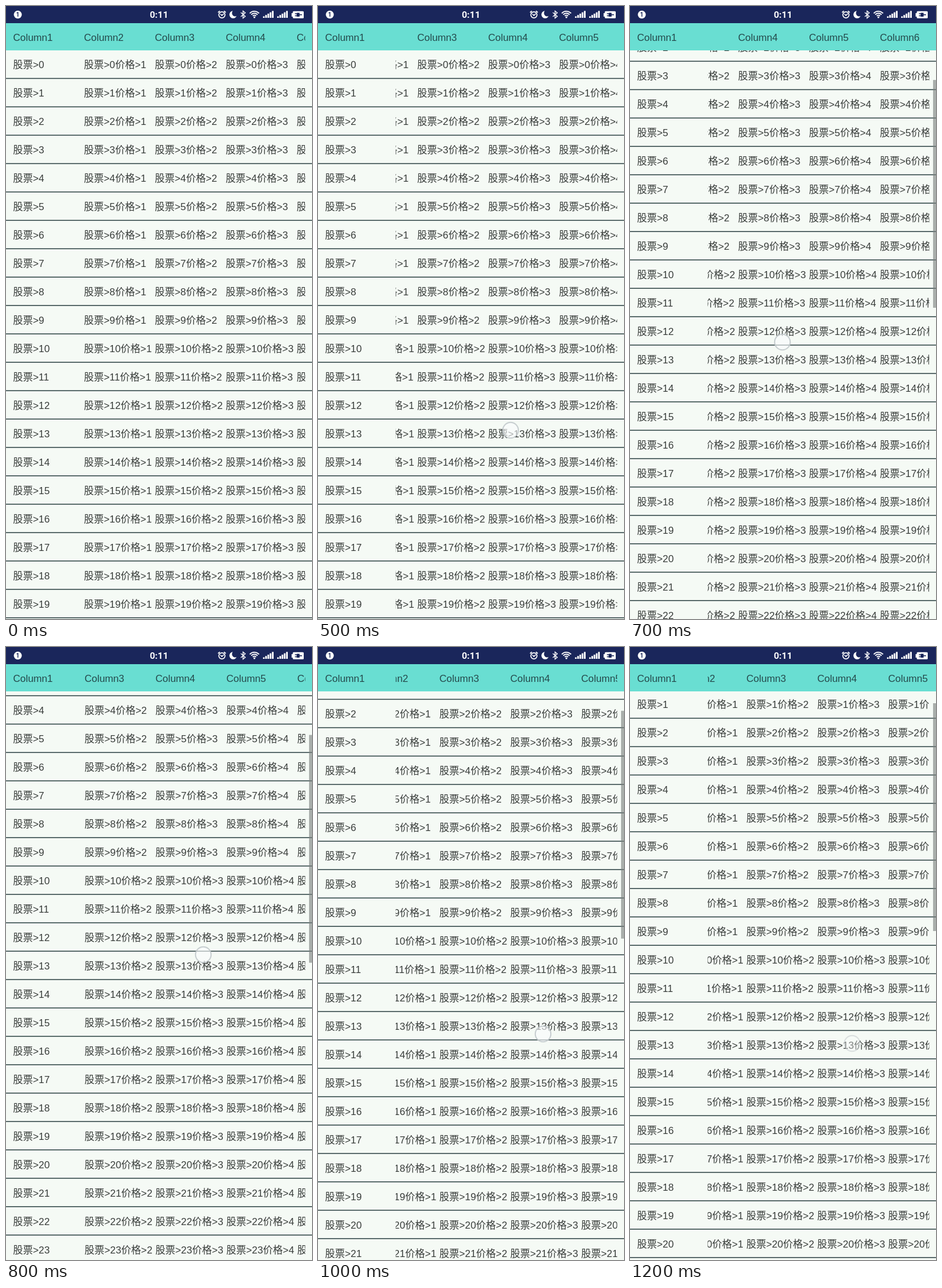
Write an HTML page with a canvas that moves like this. It is 518 px wide and 1036 px high and loops after 1300 ms.

```html
<!DOCTYPE html>
<html lang="zh">
<head>
<meta charset="utf-8">
<style>
  html, body { margin: 0; height: 100%; overflow: hidden; background: #f5faf5; }
  canvas { display: block; }
</style>
</head>
<body>
<canvas id="stage" width="518" height="1036"></canvas>
<script>
const W = 518, H = 1036, BAR = 29, TOP = 75, ROW = 47.97, COL = 120, PAD = 12;
const STEP = 100, LOOP = 1300;
const FONT = '16.8px "Liberation Sans", "Noto Sans CJK SC", "Noto Sans CJK", sans-serif';
const c = document.getElementById('stage').getContext('2d');

// One pose per step: scroll x, scroll y, touch x, touch y, touch opacity
const poses = [
  [0, 0, 0, 0, 0],
  [0, 0, 0, 0, 0],
  [0, 0, 0, 0, 0],
  [0, 0, 408, 722, .8],
  [28, 0, 382, 721, 1],
  [84, 0, 326, 717, 1],
  [150, 55, 272, 650, 1],
  [189, 125, 258, 568, 1],
  [119, 184, 334, 520, 1],
  [70, 132, 370, 590, 1],
  [46.5, 82, 381, 654, 1],
  [51, 60, 378, 667, .9],
  [55, 50, 376, 670, .6]
];

function rect(x, y, w, h, color) {
  c.fillStyle = color;
  c.fillRect(x, y, w, h);
}

function clipped(x, y, w, h, draw) {
  c.save();
  c.beginPath();
  c.rect(x, y, w, h);
  c.clip();
  draw();
  c.restore();
}

function circle(x, y, r, from = 0, to = Math.PI * 2) {
  c.beginPath();
  c.arc(x, y, r, from, to);
}

function line(...points) {
  c.beginPath();
  for (let i = 0; i < points.length; i += 2) c.lineTo(points[i], points[i + 1]);
  c.stroke();
}

// First column stays put, the others scroll sideways
function cells(y, h, baseline, sx, label) {
  clipped(0, y, 132, h, () => c.fillText(label(0), PAD, baseline));
  clipped(131.5, y, 375, h, () => {
    for (let i = 1; i < 8; i++) c.fillText(label(i), PAD + COL * i - sx, baseline);
  });
}

function rows(sx, sy) {
  c.font = FONT;
  for (let r = 0; r < 26; r++) {
    const y = TOP + r * ROW - sy;
    if (y < TOP - ROW || y > H) continue;
    c.fillStyle = '#383c3a';
    cells(y, ROW, y + 30.2, sx, i => `股票>${r}` + (i ? `价格>${i}` : ''));
    rect(0, y + 46.7, W, 1.5, '#2c4143');
  }
}

function header(sx) {
  rect(0, BAR, W, TOP - BAR, '#69ded2');
  c.fillStyle = '#24494b';
  c.font = FONT;
  cells(BAR, TOP - BAR, 58.6, sx, i => 'Column' + (i + 1));
}

function signal(x) {
  for (let i = 0; i < 5; i++) {
    const h = 2.5 + i * 2.3;
    rect(x + i * 3.8, 20 - h, 2.8, h, '#fff');
  }
}

function statusBar() {
  const navy = '#1a265b';
  rect(0, 0, W, BAR, navy);
  c.fillStyle = c.strokeStyle = '#fff';

  circle(20, 14.5, 6.7);
  c.fill();
  c.textAlign = 'center';
  c.font = 'bold 15.5px Roboto, sans-serif';
  c.fillText('0:11', 259, 20);
  c.fillStyle = navy;
  c.font = 'bold 10px Roboto, sans-serif';
  c.fillText('1', 19.8, 18);
  c.textAlign = 'left';

  // Alarm
  c.lineWidth = 1.7;
  circle(365.5, 15, 5.2);
  c.stroke();
  line(359, 11, 362, 8.3);
  line(369, 8.3, 372, 11);
  line(363, 13.5, 365.5, 16, 368.5, 13);

  // Moon
  c.fillStyle = '#fff';
  circle(384.5, 14.5, 6.3);
  c.fill();
  c.fillStyle = navy;
  circle(388, 12, 5.5);
  c.fill();

  // Bluetooth
  c.lineWidth = 1.4;
  line(397.5, 11, 405, 17.5, 401.3, 20.5, 401.3, 8.5, 405, 11.5, 397.5, 18);

  // Wi-Fi
  c.lineWidth = 1.9;
  for (const r of [3.8, 7.2, 10.6]) {
    circle(420.5, 19.5, r, -2.4, -.74);
    c.stroke();
  }
  c.fillStyle = '#fff';
  circle(420.5, 19, 1.6);
  c.fill();

  signal(435);
  signal(459);

  // Charging battery
  rect(483.5, 12, 3, 6, '#fff');
  c.beginPath();
  c.roundRect(485.5, 8.7, 18.5, 12, 1.5);
  c.fill();
  rect(492, 11.5, 5, 6.5, navy);
  rect(489, 12.3, 3, 1.4, navy);
  rect(489, 15.8, 3, 1.4, navy);
  rect(497, 14, 4, 1.5, navy);
}

function touch(x, y, alpha) {
  c.globalAlpha = alpha;
  circle(x, y, 13.2);
  c.fillStyle = 'rgba(250,252,253,.6)';
  c.fill();
  c.lineWidth = 2;
  c.strokeStyle = 'rgba(190,197,201,.85)';
  c.stroke();
  c.globalAlpha = 1;
}

function frame() {
  const step = Math.floor(performance.now() % LOOP / STEP);
  const [sx, sy, x, y, alpha] = poses[step];
  rect(0, 0, W, H, '#f5faf5');
  clipped(0, TOP, W, H - TOP, () => rows(sx, sy));
  header(sx);
  statusBar();
  if (sy) rect(513, TOP + .4 * sy, 5, 385, 'rgba(125,130,128,.62)');
  if (alpha) touch(x, y, alpha);
  requestAnimationFrame(frame);
}
frame();
</script>
</body>
</html>
```
